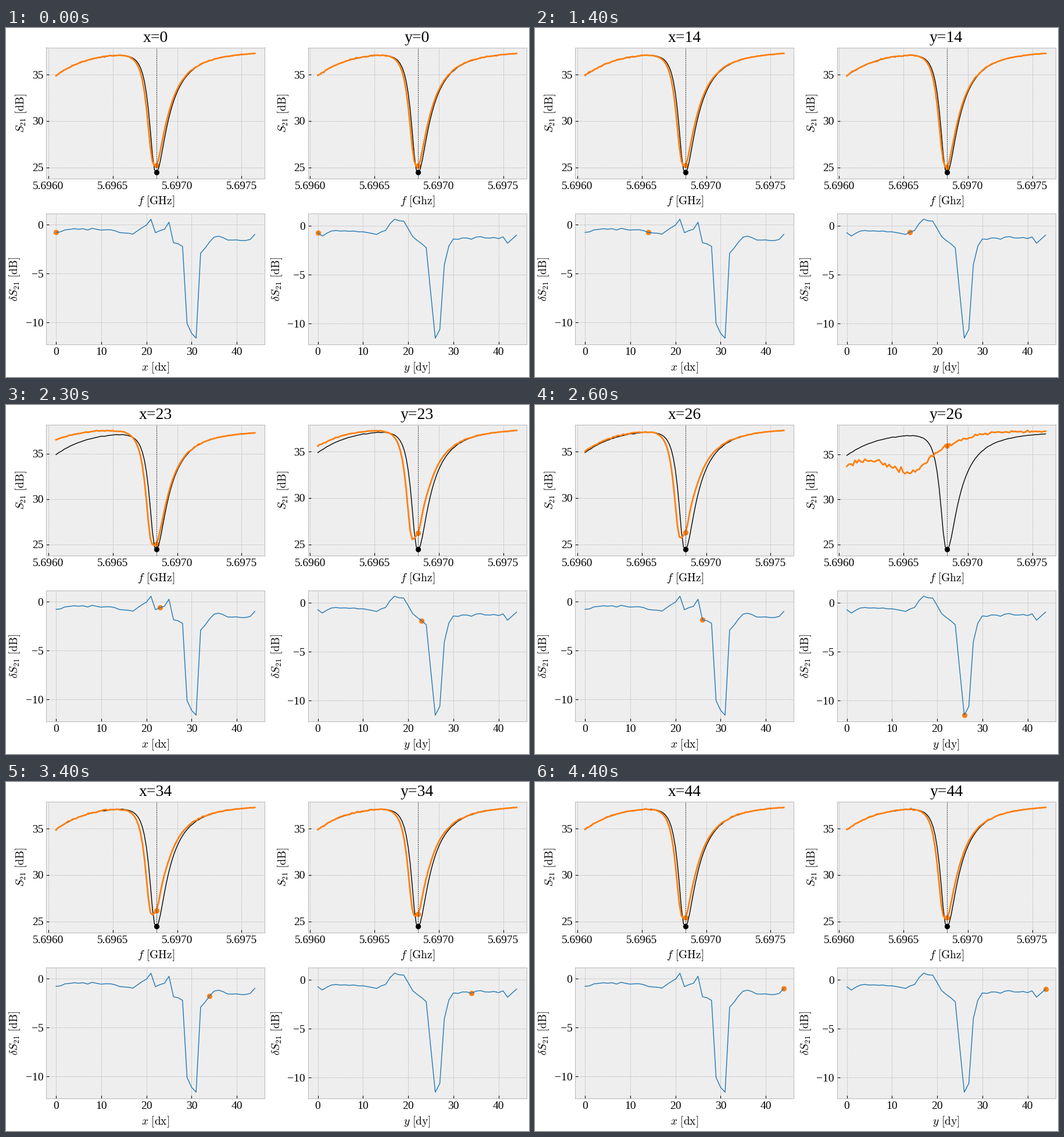
These frames come from a looping animation (900 px wide and 600 px high, 4500 ms). A matplotlib script:

```python
import matplotlib.pyplot as plt
import numpy as np
from matplotlib.animation import FuncAnimation
from matplotlib.ticker import FormatStrFormatter, MultipleLocator

W, H = 900, 600
STEPS = 45
N, REST = 100, 50
PEAK, FLOOR = 37.66, 24.45
BLUE, ORANGE = "#1f77b4", "#ff7f0e"

plt.rcParams.update({
    "font.family": "Liberation Serif", "font.size": 14,
    "mathtext.fontset": "cm",
    "axes.facecolor": "#eeeeee", "axes.edgecolor": "#bcbcbc",
    "axes.axisbelow": True, "axes.grid": True,
    "grid.color": "#b2b2b2", "grid.linestyle": "--", "grid.linewidth": 0.5,
    "xtick.direction": "in", "ytick.direction": "in", "xtick.major.pad": 4,
})

# Corners of the two scans: (position, dip shift in dB).
SCAN_X = [(0, -.77), (4, -.4), (11, -.5), (17, -.95), (20, -.03), (21, .58),
          (22, -.8), (24, -.45), (25, .27), (26, -1.83), (28, -2.2),
          (29, -10.1), (30, -11.1), (31, -11.6), (32, -2.9), (35, -1.25),
          (42, -1.6), (44, -.97)]
SCAN_Y = [(0, -.7), (1, -1.03), (3, -.52), (10, -.6), (13, -.87), (15, -.46),
          (17, .69), (19, .5), (21, -1.1), (24, -2.24), (26, -11.5),
          (27, -10.6), (28, -3.97), (29, -2.06), (30, -1.33), (41, -1.12),
          (42, -1.77), (44, -.94)]

freq = np.linspace(5.6960592, 5.6976035, N)
u = np.linspace(-172.6, 169.2, N)   # distance from resonance, in pixels
u -= u[REST]


def bell(x, center, width):
    return np.exp(-0.5 * ((x - center) / width) ** 2)


def noise(seed):
    return np.random.default_rng(seed).normal(size=N)


def resonance(x):
    """Notch with a steep left flank, a slow right one and a sagging left wing."""
    power = np.where(x < 0, np.abs(x) ** 3 / 11000, x ** 2 / 2700)
    depth = 10 ** ((FLOOR - PEAK) / 10)
    v = np.clip(-x / 173, 0, None)
    return PEAK + 10 * np.log10((power + depth) / (power + 1)) - v - 1.78 * v ** 4


def detuned(x):
    """Response without a notch: a wavy plateau rising to the right."""
    rise = 35.6 + 2 * np.tanh((x + 9) / 60)
    return rise + 0.75 * bell(x, -134, 22) - 1.2 * bell(x, -61, 22)


grain = np.interp(u, [-172, -60, -40, 40, 60, 170], [.035, .03, 0, 0, .03, .01])
ref = resonance(u) + 0.5 * grain * noise(1)


def sweep(delta, tail, seed):
    """Response curve whose level at the rest frequency is shifted by delta."""
    m = np.clip(-delta, 0, 2.2)
    left, right = 0.9 + 3.2 * m + 1.9 * tail, 3.2 * m
    shift = left + (right - left) * np.clip((u + 9) / 20, 0, 1)
    shift *= (1 - 0.55 * np.exp(-(u / 8) ** 2)) * np.exp(-(u / 90) ** 2)
    y = resonance(u + shift)
    y += tail * np.exp((u[0] - u) / 75) * np.clip(-(u + 14) / 40, 0, 1)
    k = np.clip((-delta - 3) / 8, 0, 1)
    y += k * (detuned(u) - y)
    rough = grain + k * np.interp(u, [-50, 100], [.13, .03])
    y += rough * noise(seed)
    return y + (FLOOR - delta - y[REST]) * np.exp(-((u + 1) / 12) ** 2)


def scan(corners, seed):
    """Dip shift per step: straight runs between corners, jitter elsewhere."""
    at, level = zip(*corners)
    jitter = np.random.default_rng(seed).normal(0, 0.08, STEPS)
    jitter[list(at)] = 0
    return np.interp(np.arange(STEPS), at, level) + jitter


def add_axes(x, y):
    return fig.add_axes([x / W, 1 - (y + 225) / H, 376.3 / W, 225 / H])


def label(x, y, text, rotation=0):
    fig.text(x / W, 1 - y / H, text, ha="center", va="baseline",
             rotation=rotation, rotation_mode="anchor")


def dot(ax, x, y, color, z):
    return ax.plot([x], [y], "o", ms=6, mew=0.6, color=color, zorder=z)[0]


class Panel:
    def __init__(self, x0, name, unit, corners, bump):
        self.name = name
        height, center, width = bump
        n = np.arange(STEPS)
        seed = 100 * ord(name)
        self.deltas = scan(corners, seed)
        tails = height * bell(n, center, width)
        self.curves = [sweep(d, a, seed + i)
                       for i, (d, a) in enumerate(zip(self.deltas, tails))]

        top = self.top = add_axes(x0, 33.5)
        top.plot(freq, ref, color="black", lw=1)
        self.line, = top.plot(freq, ref, color=ORANGE, lw=2)
        self.level = dot(top, freq[REST], FLOOR, ORANGE, 1.9)
        top.axvline(freq[REST], color="black", ls="--", lw=0.5, zorder=3)
        dot(top, freq[REST], FLOOR, "black", 4)
        top.xaxis.set_major_locator(MultipleLocator(0.0005))
        top.xaxis.set_major_formatter(FormatStrFormatter("%.4f"))
        top.yaxis.set_major_locator(MultipleLocator(5))
        self.title = top.set_title("", fontsize=20, pad=6.5, y=1.0)

        low = add_axes(x0, 318.5)
        low.plot(n, self.deltas, color=BLUE, lw=1)
        self.mark = dot(low, 0, self.deltas[0], ORANGE, 1.9)
        low.xaxis.set_major_locator(MultipleLocator(10))
        low.yaxis.set_major_locator(MultipleLocator(5))

        label(x0 + 189, 303, rf"$f\ [\mathrm{{{unit}}}]$")
        label(x0 + 188, 589, rf"${name}\ [\mathrm{{d{name}}}]$")
        label(x0 - 37.5, 146, r"$S_{21}\ [\mathrm{dB}]$", 90)
        label(x0 - 48.5, 431.5, r"$\delta S_{21}\ [\mathrm{dB}]$", 90)

    def show(self, i):
        y = self.curves[i]
        self.line.set_ydata(y)
        self.level.set_ydata([y[REST]])
        self.mark.set_data([i], [self.deltas[i]])
        self.title.set_text(f"{self.name}={i}")
        lo, hi = min(y.min(), ref.min()), max(y.max(), ref.max())
        pad = 0.05 * (hi - lo)
        self.top.set_ylim(lo - pad, hi + pad)


fig = plt.figure(figsize=(W / 100, H / 100), dpi=100, facecolor="white")
panels = [Panel(69, "x", "GHz", SCAN_X, (2.2, 21.5, 2)),
          Panel(519.5, "y", "Ghz", SCAN_Y, (1.1, 21, 2))]


def update(i):
    for panel in panels:
        panel.show(i)


anim = FuncAnimation(fig, update, frames=STEPS, interval=100, repeat=True)
plt.show()
```
